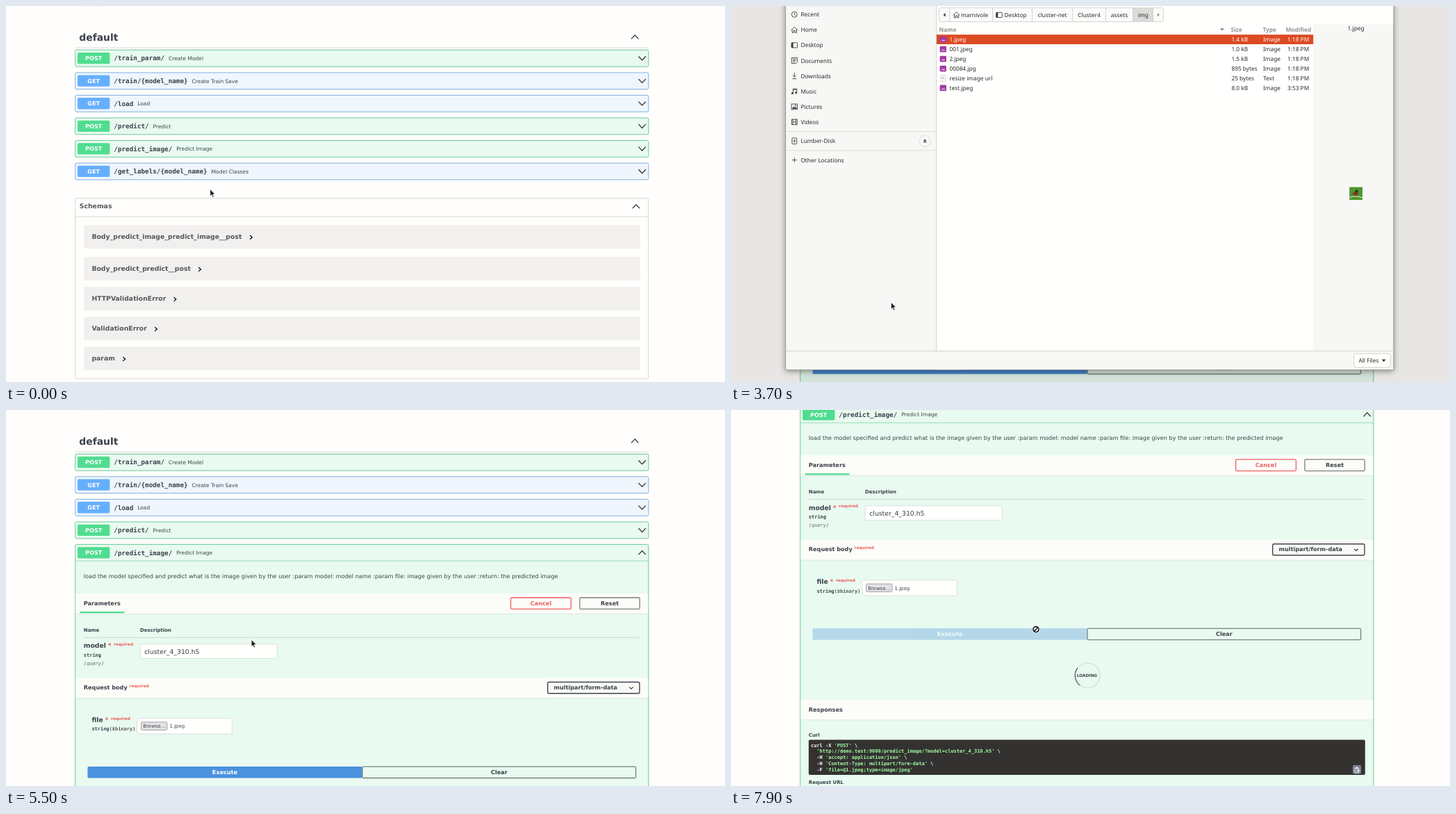
Animation of 1035x541 px, one loop 8000 ms. Source, as an HTML page:

```html
<!DOCTYPE html>
<html lang="en">
<head>
<meta charset="utf-8">
<title>API walkthrough</title>
<style>
html, body { margin: 0; width: 100%; height: 100%; overflow: hidden; background: #fffefc; }
svg { display: block; width: 1035px; height: 541px; }
text { font: 8.14px "DejaVu Sans", sans-serif; fill: #3b4149; white-space: pre; text-rendering: geometricPrecision; }
.b { font-weight: 700; }
.xs { font-size: 5.82px; }
.s { font-size: 6.98px; }
.d { font-size: 7.56px; }
.l { font-size: 9.31px; }
.xl { font-size: 13.96px; }
.m { font-family: "DejaVu Sans Mono", monospace; }
.i { font-style: italic; fill: #666; }
.mid { text-anchor: middle; }
.w { fill: #fff; }
.g { fill: #a2fca2; }
.red { fill: #ee6060; }
.soft { fill: #55585c; }
.ui { font: 8.3px "Noto Sans", sans-serif; fill: #2b2b2b; }
.ui.head { font-weight: 700; fill: #929290; }
.ui.w { fill: #fff; }
.icon { fill: none; stroke: #3d3d3d; stroke-width: .9; }
.icon .f { fill: #3d3d3d; stroke: none; }
#window { filter: drop-shadow(0 2px 4px rgba(0,0,0,.4)); }
</style>
</head>
<body>
<svg id="stage" viewBox="0 0 1035 541"></svg>
<script>
const INK = '#3b4149', GREEN = '#50dd90', BLUE = '#66affd', PALE = '#f7f7f5';
const MODEL = 'cluster_4_310.h5';
const scheme = 'http';
const URL_TEXT = `${scheme}://demo.test:9000/predict_image/?model=${MODEL}`;

const text = (x, y, s, cls = '') => `<text x="${x}" y="${y}" class="${cls}">${s}</text>`;
const box = (x, y, x2, y2, fill, stroke = 'none', sw = 1, r = 0) =>
  `<rect x="${x}" y="${y}" width="${x2 - x}" height="${y2 - y}" rx="${r}" fill="${fill}" stroke="${stroke}" stroke-width="${sw}"/>`;
const path = (d, stroke = '#222', sw = 1, fill = 'none') =>
  `<path d="${d}" fill="${fill}" stroke="${stroke}" stroke-width="${sw}"/>`;
const hline = (x, x2, y, color = '#c6cac9', sw = .7) => path(`M${x} ${y}H${x2}`, color, sw);
const group = (id, body, attrs = '') => `<g id="${id}" ${attrs}>${body}</g>`;

// Page parts
const chevron = (x, y, up) => {
  const h = up ? -2.7 : 2.7;
  return path(`M${x - 5.2} ${y - h}L${x} ${y + h}L${x + 5.2} ${y - h}`, '#222', 1.2);
};

function card(y, bottom, post) {
  return box(99.8, y, 924.8, bottom, 'none', 'rgba(0,0,0,.06)', 2.6, 2.4) +
    box(99.8, y, 924.8, bottom, post ? '#e9faf0' : '#eff6fe', post ? '#6fd3a2' : '#86b9ea', 1, 2);
}

function rowHead(c, post, route, summary, up) {
  return box(103, c - 8.2, 149.4, c + 8.1, post ? GREEN : BLUE, 'none', 0, 1.8) +
    text(126.2, c + 3, post ? 'POST' : 'GET', 'b w mid') +
    text(155.3, c + 3.2, route, 'm b l') +
    text(155.3 + route.length * 5.605 + 5.8, c + 2.8, summary, 'd') +
    chevron(915.7, c, up);
}

const rowY = i => 75.2 + i * 32.55;
const row = (i, post, route, summary) =>
  card(rowY(i) - 11.8, rowY(i) + 11.9, post) + rowHead(rowY(i), post, route, summary);

const schema = ([name, c, x]) =>
  box(112, c - 17, 912.8, c + 17, '#f1f0ef', 'none', 0, 2) +
  text(123.4, c + 3.2, name, 'b l soft') +
  path(`M${x - 1.8} ${c - 1.9}l3.2 2.8l-3.2 2.8`, '#111', 1.3);

const closedPart = () =>
  row(4, true, '/predict_image/', 'Predict Image') +
  row(5, false, '/get_labels/{model_name}', 'Model Classes') +
  box(99.7, 276.6, 924.7, 536, 'none', '#c9cccb', .8, 2) +
  text(105.8, 291.2, 'Schemas', 'b l soft') + chevron(907, 288.5, true) +
  hline(99.7, 924.7, 303.2) +
  [['Body_predict_image_predict_image__post', 332, 353], ['Body_predict_predict__post', 378, 279],
   ['HTTPValidationError', 421, 243.4], ['ValidationError', 464, 216], ['param', 507, 170.2]]
    .map(schema).join('');

const bar = (y, y2) => box(100.4, y, 924.2, y2, '#fcfdf9') + hline(100.4, 924.2, y2 + .3, '#d3e3da');
const button = (x, y, x2, label, color, cls) =>
  box(x, y, x2, y + 16.4, 'none', color, 1.3, 1.5) + text((x + x2) / 2, y + 11, label, 'b mid ' + cls);
const required = (x, y) => text(x, y, '*', 'b l red') + text(x + 8.3, y - 3.2, 'required', 'b xs red');

const codeLine = (y, parts) =>
  `<text x="115" y="${y}" class="m b s w">${parts.map((p, i) => i % 2 ? `<tspan class="g">'${p}'</tspan>` : p).join('')}</text>`;

const responses = () =>
  bar(349, 378) + text(111.8, 366, 'Responses', 'b') +
  text(111.8, 402, 'Curl', 'b s') +
  box(111.8, 407, 912.8, 457.4, '#333231', 'none', 0, 2) +
  [['curl -X ', 'POST', ' \\'],
   ['  ', URL_TEXT, ' \\'],
   ['  -H ', 'accept: application/json', ' \\'],
   ['  -H ', 'Content-Type: multipart/form-data', ' \\'],
   ['  -F ', 'file=@<tspan id="sent"></tspan>;type=image/jpeg']]
    .map((parts, i) => codeLine(417.1 + i * 8.73, parts)).join('') +
  box(895, 443.4, 907, 455.8, '#7d8293', 'none', 0, 2) +
  box(898, 447.6, 903.6, 454.3, 'none', '#fff', .9, .6) + box(899.3, 446.4, 902.2, 448.6, '#fff') +
  path('M905.5 451.3h-4.6m1.7 -1.7l-1.7 1.7l1.7 1.7', '#fff', .8) +
  text(111.8, 470, 'Request URL', 'b s') +
  box(111.8, 475, 912.8, 494.6, '#333231', 'none', 0, 2) +
  text(117.4, 487.6, URL_TEXT, 'm b s w') +
  text(111.8, 508, 'Server response', 'b s') +
  text(111.8, 527.4, 'Code', 'b') + text(160.2, 527, 'Details', 'b s') +
  hline(111.8, 912.8, 536.6);

const openPart = () =>
  card(193.5, 1000, true) + hline(100, 924.6, 217.2, '#8fdcb6', .9) +
  rowHead(rowY(4), true, '/predict_image/', 'Predict Image', true) +
  text(111.8, 241.8, 'load the model specified and predict what is the image given by the user :param model: model name :param file: image given by the user :return: the predicted image') +
  bar(264, 293) + text(111.8, 281, 'Parameters', 'b') + box(106.5, 290, 170.4, 292.3, GREEN) +
  button(726.6, 270, 813.4, 'Cancel', '#ee6060', 'red') +
  button(825.9, 270, 912.2, 'Reset', '#7c8080', '') +
  text(111.8, 318.6, 'Name', 'b s') + text(193, 318.6, 'Description', 'b s') +
  hline(111.8, 912.8, 327.4) +
  text(111.8, 342.4, 'model', 'b l') + required(146.8, 342.4) +
  text(111.8, 354.6, 'string', 'm b s') + text(111.8, 366.6, '(query)', 'm s i') +
  box(193.2, 336.6, 390.4, 357.6, '#fffffe', '#d6dad7', .8, 2) + text(199.2, 350.6, MODEL, 'l') +
  bar(385.6, 414.6) + text(111.8, 402.2, 'Request body', 'b') + text(177.8, 398.7, 'required', 'b xs red') +
  box(779.7, 391.5, 912, 407.8, '#f8faf6', '#41444e', 1.4, 2) +
  text(788.6, 402.2, 'multipart/form-data', 'b') + path('M897.3 398.7l2.7 2.6l2.7 -2.6', '#222', 1.1) +
  text(123.4, 449.2, 'file', 'b l') + required(142.6, 449.2) +
  text(123.4, 461.4, 'string<tspan class="soft">($binary)</tspan>', 'm b s') +
  box(188.7, 443.6, 325.4, 466, '#fffffe', '#d6dad7', .8, 2) +
  box(194.6, 449, 231.9, 460.4, '#e4e4e7', '#8b8b8e', .8, 1.6) + text(213.3, 457.4, 'Browse…', 's mid') +
  `<text id="chosen" x="235.5" y="457.4" class="s"></text>` +
  group('execute', box(117.4, 512.9, 513, 529.6, '#4b91dd', 'none', 0, 2) + text(315, 524, 'Execute', 'b w mid')) +
  button(513, 513.1, 906.6, 'Clear', '#7c8080', '') +
  group('loading', group('ring',
    `<circle r="17.9" fill="none" stroke="rgba(85,85,85,.16)" stroke-width="1.2"/>` +
    path('M-12.65 -12.65A17.9 17.9 0 0 1 12.65 -12.65', 'rgba(0,0,0,.6)', 1.3)) +
    text(512.4, 582.6, 'LOADING', 'b xs mid')) +
  group('responses', responses()) +
  box(102.2, 196.2, 922.6, 214.8, 'none', '#cf5630', 1.4, 1).replace('<rect', '<rect id="inputSpare" display="none"');

const page = () =>
  text(99.6, -.7, '/openapi.json', 's soft') +
  text(105.2, 49.9, 'default', 'b xl') + chevron(905.3, 44.6, true) + hline(99.4, 925, 60.2) +
  row(0, true, '/train_param/', 'Create Model') +
  row(1, false, '/train/{model_name}', 'Create Train Save') +
  row(2, false, '/load', 'Load') +
  row(3, true, '/predict/', 'Predict') +
  group('closed', closedPart()) + group('open', openPart()) +
  group('headFocus', box(102.2, 196.2, 922.6, 214.8, 'none', '#cf5630', 1.4, 1)) +
  group('inputFocus', box(192.4, 335.7, 391.4, 358.4, 'none', '#cf5630', 1.3, 2));

// File dialog parts, icons are drawn around 0,0
const ICONS = {
  recent: '<circle r="4"/><path d="M0 -2.4V.3L1.8 1.6"/>',
  home: '<path d="M-4.6 .4L0 -4L4.6 .4M-3.2 -.6V4H-1V1H1V4H3.2V-.6"/>',
  desktop: '<rect x="-4.3" y="-3.6" width="8.6" height="7.2" rx="1"/><path class="f" d="M-4.3 -3.6h2.6v7.2h-2.6z"/>',
  documents: '<path d="M-4 -4H4V2L2 4H-4zM-2.2 -1.8H2.2M-2.2 0H2.2M-2.2 1.8H.6"/>',
  downloads: '<path d="M0 -4.2V1.4M-2.4 -.8L0 1.6L2.4 -.8M-3 4H3"/>',
  music: '<path d="M-2 2.6V-3.6H3.4V1.8M-2 -2.2H3.4"/><circle class="f" cx="-3" cy="2.8" r="1.5"/><circle class="f" cx="2.4" cy="2" r="1.5"/>',
  pictures: '<rect x="-4.2" y="-3.8" width="8.4" height="7.6"/><path class="f" d="M-3.4 3L-1.2 -.4L.6 1.2L2 -.4L3.4 3z"/><circle class="f" cx="1.4" cy="-1.8" r=".9"/>',
  videos: '<path d="M-4 -3.8H4V3.8H-4zM-2.2 -3.8V3.8M2.2 -3.8V3.8M-2.2 0H2.2"/>',
  drive: '<rect x="-3.4" y="-4.3" width="6.8" height="8.6" rx="1"/><path d="M0 -2.4V2.4M-1.6 -.6L0 1L1.6 -.6"/>',
  plus: '<path d="M-3.4 0H3.4M0 -3.4V3.4"/>'
};
const icon = (name, x, y) => `<g class="icon" transform="translate(${x} ${y})">${ICONS[name]}</g>`;
const place = (name, label, c) => icon(name, 91.3, c) + text(100.4, c + 3, label, 'ui');

function fileRow([name, size, type, time], i) {
  const c = 48.2 + i * 13.95, cls = i ? 'ui' : 'ui w';
  const mark = type === 'Image'
    ? box(300.6, c - 4.4, 310, c + 4.4, '#a33ba0', 'none', 0, 1.6) + path(`M302.6 ${c + 2.4}l2 -2.6l1.4 1.4l1.2 -1.2l1 2.4z`, 'none', 0, '#e3a6e0')
    : box(301.4, c - 4.4, 309.2, c + 4.4, '#fafafa', '#c8c8c8', .7, .6) + path(`M303 ${c - 1.4}h3.6m-3.6 1.8h4.4`, '#aaa', .7);
  return (i ? '' : box(296, c - 7, 838.2, c + 6.8, '#dc4a22')) + mark +
    text(314.4, c + 2.9, name, cls) + text(720.4, c + 2.9, size, cls) +
    text(766, c + 2.9, type, cls) + text(801, c + 2.9, time, cls);
}

const dialog = () =>
  `<rect id="window" x="78.6" y="-20" width="875.2" height="543.6" rx="1" fill="${PALE}" stroke="#8d8d8b" stroke-width=".8"/>` +
  box(296, -5, 953.2, 26, '#fffffd') + box(296, 26, 838.4, 496, '#fffffd') +
  path('M295.6 0V496.4', '#cfcfcb', .9) + hline(79, 953.4, 496.4, '#cfcfcb', .9) +
  ['Recent', 'Home', 'Desktop', 'Documents', 'Downloads', 'Music', 'Pictures', 'Videos']
    .map((n, i) => place(n.toLowerCase(), n, 12.2 + i * 22.1)).join('') +
  hline(79, 295, 180.6, '#dcdcd9', .9) + hline(79, 295, 207.8, '#dcdcd9', .9) +
  place('drive', 'Lumber-Disk', 194.2) + place('plus', 'Other Locations', 221.6) +
  `<circle cx="279.2" cy="194.3" r="7.8" fill="#fbfbfa" stroke="#d5d5d2" stroke-width=".9"/>` +
  path('M276.8 194.6l2.4 -3l2.4 3zM276.8 195.6h4.8v1h-4.8z', 'none', 0, '#333') +
  box(299.7, 2.7, 622.4, 22.6, '#fbfbfa', '#cdcdc9', .9, 2.5) + box(578.6, 3, 607.4, 22.3, '#dcdbd9') +
  [314.6, 376.6, 433.5, 491.6, 539.5, 578.6, 607.4].map(x => path(`M${x} 2.7V22.6`, '#cdcdc9', .9)).join('') +
  path('M308.6 10v5.4l-3 -2.7z', 'none', 0, '#333') + path('M613.8 10v5.4l3 -2.7z', 'none', 0, '#888') +
  icon('home', 324.6, 12.9) + icon('desktop', 386, 12.9) +
  [[350.6, 'marnivole'], [409.6, 'Desktop'], [462.6, 'cluster-net'], [515.5, 'Cluster4'], [559, 'assets'], [593.4, 'img']]
    .map(([x, s]) => text(x, 15.8, s, 'ui mid')).join('') +
  [[299.5, 'Name'], [719.5, 'Size'], [765.4, 'Type'], [798.5, 'Modified']]
    .map(([x, s]) => text(x, 36.8, s, 'ui head')).join('') +
  path('M704 32.2h6l-3 3.4z', 'none', 0, '#7d7d7b') +
  [['1.jpeg', '1.4 kB', 'Image', '1:18 PM'], ['001.jpeg', '1.0 kB', 'Image', '1:18 PM'],
   ['2.jpeg', '1.5 kB', 'Image', '1:18 PM'], ['00084.jpg', '895 bytes', 'Image', '1:18 PM'],
   ['resize image url', '25 bytes', 'Text', '1:18 PM'], ['test.jpeg', '8.0 kB', 'Image', '3:53 PM']]
    .map(fileRow).join('') +
  text(899.6, 35, '1.jpeg', 'ui mid') +
  box(890.2, 260.6, 909, 279, '#4c962c') +
  path('M890.2 275.4Q900 272 909 275.8', '#c9d3bb', 1.3) +
  `<ellipse cx="899" cy="270" rx="4" ry="2.8" fill="#7d3b22"/><circle cx="900.6" cy="266.6" r="2" fill="#2d2a20"/>` +
  box(896.7, 500.2, 949.4, 520, '#fffffd', '#cdcdc9', .9, 2.5) + text(903.4, 513.1, 'All Files', 'ui') +
  path('M936.6 508.6h6l-3 3.4z', 'none', 0, '#333');

const cursors = () =>
  group('arrow', path('M0 0V10L2.2 8L3.8 11.6L5.5 10.8L3.9 7.4L7 7.1Z', '#fff', .7, '#1d1d1d')) +
  group('hand', path('M-1 0Q0 -1.6 1 0V4L5 5Q6.4 5.6 6 7.4L5 11.4H-.8L-4 7Q-3.6 5.6 -1 7Z', '#fff', .7, '#1d1d1d')) +
  group('beam', path('M-2.4 -5Q0 -5 0 -4V4Q0 5 -2.4 5M2.4 -5Q0 -5 0 -4M2.4 5Q0 5 0 4', '#222', .9)) +
  group('stop', `<circle r="4" fill="none" stroke="#fff" stroke-width="3"/><circle r="4" fill="#f4f8f6" stroke="#1d1d1d" stroke-width="1.7"/>` +
    path('M-2.8 2.8L2.8 -2.8', '#1d1d1d', 1.6));

const stage = document.getElementById('stage');
stage.innerHTML = group('page', page().replace(/<rect id="inputSpare"[^>]*>/, '')) +
  `<rect id="dim" width="1035" height="541"/>` + group('dialog', dialog()) + group('cursor', cursors());
const $ = id => document.getElementById(id);

// Motion: [time, value...] keys with linear travel between them
const DIM = [[3400, 0], [4400, .31], [5200, .31], [5300, .2], [5500, 0]];
const POINTER = [
  [100, 293.8, 263.6], [500, 300, 204], [1100, 300, 204], [1700, 276.6, 342], [1800, 276.6, 342], [2000, 278.2, 342],
  [2600, 278.2, 342], [3000, 205, 420], [3200, 178, 448], [3400, 212, 455], [3500, 212, 455],
  [3700, 230.4, 426.4], [4400, 322, 105], [4800, 357, 46.6], [5200, 357, 46.6], [5300, 351.8, 253.8],
  [5500, 353.2, 330.4], [5900, 353.2, 330.4], [6000, 354.6, 339.6], [6200, 354.6, 339.6], [6900, 439, 315.6]
];
const SHAPES = [[0, 'arrow'], [300, 'hand'], [1300, 'arrow'], [1600, 'beam'], [2700, 'arrow'], [6500, 'hand'], [7100, 'stop']];

function sample(keys, t) {
  const next = keys.findIndex(k => k[0] > t);
  if (next === 0) return keys[0].slice(1);
  if (next < 0) return keys[keys.length - 1].slice(1);
  const a = keys[next - 1], b = keys[next], f = (t - a[0]) / (b[0] - a[0]);
  return a.slice(1).map((v, i) => v + (b[i + 1] - v) * f);
}
const show = (id, on) => $(id).setAttribute('display', on ? 'inline' : 'none');
const move = (id, x, y, more = '') => $(id).setAttribute('transform', `translate(${x} ${y})${more}`);

function draw(t) {
  const loading = t >= 7100;
  show('closed', t < 1000);
  show('open', t >= 1000);
  show('headFocus', t >= 700 && t < 2200);
  show('inputFocus', t >= 2200 && t < 3300);
  show('dialog', t >= 3600 && t < 5300);
  show('loading', loading);
  move('page', 0, t < 6200 ? 0 : -198.8);
  move('responses', 0, loading ? 266.4 : 198.8);
  move('ring', 513.2, 580.8, ` rotate(${(t - 7100) * .36 - 26})`);
  $('ring').setAttribute('opacity', Math.min(1, Math.max(0, (t - 7000) / 500)));
  $('execute').setAttribute('opacity', loading ? .33 : 1);
  $('chosen').textContent = t < 5300 ? 'No file selected.' : '1.jpeg';
  $('sent').textContent = loading ? '1.jpeg' : '001.jpeg';
  $('dim').setAttribute('opacity', t < 3600 ? 0 : sample(DIM, t)[0]);
  move('cursor', ...sample(POINTER, t));
  const shape = SHAPES.filter(s => s[0] <= t).pop()[1];
  ['arrow', 'hand', 'beam', 'stop'].forEach(id => show(id, id === shape));
}

const start = performance.now();
function frame() {
  draw(Math.floor((performance.now() - start) % 8000 / 100) * 100);
  requestAnimationFrame(frame);
}
frame();
</script>
</body>
</html>
```
